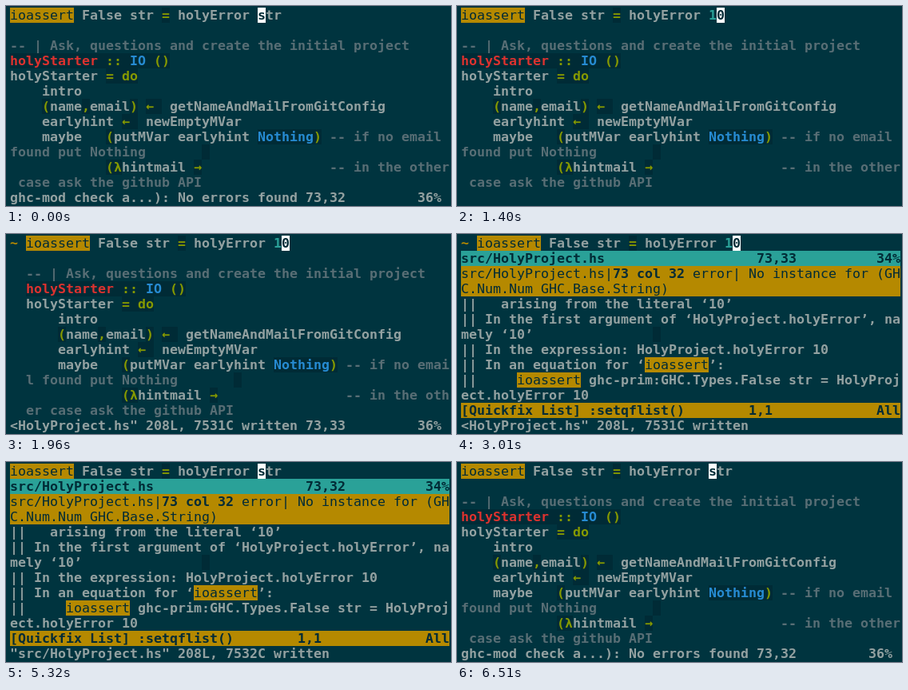
Recreate the animation shown at these times as an HTML page with a canvas. Size 557 px wide and 250 px high, loop 8190 ms.

```html
<!DOCTYPE html>
<html lang="en">
<head>
<meta charset="utf-8">
<title>Haskell editing session</title>
<style>
  html, body { margin: 0; width: 100%; height: 100%; overflow: hidden; background: #00343f; }
  canvas { display: block; }
</style>
</head>
<body>
<canvas id="stage" width="557" height="250"></canvas>
<script>
const ctx = document.getElementById('stage').getContext('2d');
const LOOP = 8190, COLS = 55, LEFT = 5, TOP = 2, CW = 10, RH = 19;
const BG = '#00343f', DARK = '#002b36', GOLD = '#b58900', TEAL = '#2aa198';
const FACE = '16.61px "DejaVu Sans Mono", "Liberation Mono", monospace';

// Styles used by the {key:text} markup
const STYLES = {
  p: { fg: '#93a1a1', bold: true },
  c: { fg: '#586e75', bold: true },
  r: { fg: '#dc322f', bg: DARK, bold: true },
  o: { fg: '#859900', bg: DARK, bold: true },
  b: { fg: '#268bd2', bg: DARK, bold: true },
  n: { fg: TEAL, bold: true },
  g: { fg: GOLD, bold: true },
  d: { fg: DARK, bg: DARK },
  s: { fg: DARK, bg: GOLD },
  S: { fg: DARK, bg: GOLD, bold: true },
  t: { fg: DARK, bg: TEAL, bold: true },
  k: { fg: DARK, bg: '#ffffff', bold: true }
};

function drawRun(row, col, text, style) {
  const x = LEFT + col * CW, y = TOP + row * RH;
  if (style.bg) {
    ctx.fillStyle = style.bg;
    ctx.fillRect(x, y, [...text].length * CW, RH);
  }
  ctx.font = (style.bold ? 'bold ' : '') + FACE;
  ctx.fillStyle = style.fg;
  ctx.fillText(text, x, y + 15);
}

function drawRow(row, line, base = 'p') {
  if (STYLES[base].bg) drawRun(row, 0, ' '.repeat(COLS), STYLES[base]);
  let col = 0;
  for (const m of line.matchAll(/\{(\w):([^}]*)\}|[^{]+/g)) {
    const text = m[1] ? m[2] : m[0];
    drawRun(row, col, text, STYLES[m[1] || base]);
    col += [...text].length;
  }
}

// Place several pieces of text at fixed columns
function columns(...parts) {
  let line = '';
  for (let i = 0; i < parts.length; i += 2) line = line.padEnd(parts[i]) + parts[i + 1];
  return line;
}

const cursor = (row, col, ch = ' ') => drawRun(row, col, ch, STYLES.k);

function drawHead(arg, sign) {
  const shown = /\d/.test(arg) ? `{n:${arg}}` : arg;
  drawRow(0, `${sign ? '{g:~} ' : ''}{s:ioassert} False str {o:=} holyError ${shown}`);
}

function drawCode(sign) {
  const gap = ' '.repeat(16);
  const wrap = sign
    ? ['emai', `{c:l found put Nothing}       {d: }`, 'oth', 'er case ask the github API']
    : ['email', `{c:found put Nothing}       {d: }`, 'other', ' case ask the github API'];
  const pad = sign ? '  ' : '';
  [
    '{c:-- | Ask, questions and create the initial project}',
    '{r:holyStarter }{o:::}{d: }{b:IO}{d: }{o:()}',
    'holyStarter {o:=}{d: }{o:do}',
    '    intro',
    '    {o:(}name{o:,}email{o:)} {o:←}{d: } getNameAndMailFromGitConfig',
    '    earlyhint {o:←}{d: } newEmptyMVar',
    `    maybe   {o:(}putMVar earlyhint {b:Nothing}{o:)} {c:-- if no ${wrap[0]}}`,
    wrap[1],
    `            {o:(λ}hintmail {o:→}${gap}{c:-- in the ${wrap[2]}}`,
    `{c:${wrap[3]}}`
  ].forEach((line, i) => drawRow(i + 2, pad + line));
}

function drawList() {
  drawRow(2, 'src/HolyProject.hs|{S:73 col 32} error| No instance for (GH', 's');
  drawRow(3, 'C.Num.Num GHC.Base.String)', 's');
  [
    '||   arising from the literal ‘10’',
    '|| In the first argument of ‘HolyProject.holyError’, na',
    'mely ‘10’' + ' '.repeat(15) + '{d: }',
    '|| In the expression: HolyProject.holyError 10',
    '|| In an equation for ‘{s:ioassert}’:',
    '||     {s:ioassert} ghc-prim:GHC.Types.False str = HolyProj',
    'ect.holyError 10'
  ].forEach((line, i) => drawRow(i + 4, line));
}

function drawPanes(pos, dirty, empty) {
  drawRow(1, columns(0, 'src/HolyProject.hs' + (dirty ? ' [+]' : ''), 37, pos, 52 - 2 + 2, '34%'), 't');
  if (empty) {
    for (let row = 3; row < 11; row++) drawRow(row, '{c:~}');
  } else {
    drawList();
  }
  drawRow(11, columns(0, '[Quickfix List] :setqflist()', 36, empty ? '0,0-1' : '1,1', 52, 'All'), 'S');
}

const ruler = (msg, pos) => columns(0, msg, 37, pos, 51, '36%');
const CHECKED = ruler('ghc-mod check a...): No errors found', '73,32');
const SAVED = '<HolyProject.hs" 208L, 7531C written';

// at: start in ms; cur: [row, col, character]; pos: opens the split panes
const SCENES = [
  { at: 0, arg: 'str', msg: CHECKED, cur: [0, 31, 's'] },
  { at: 560, arg: '', msg: ruler('-- INSERT --', '73,32'), cur: [0, 31] },
  { at: 980, arg: '1', msg: ruler('-- INSERT --', '73,33'), cur: [0, 32] },
  { at: 1120, arg: '10', msg: ruler('-- INSERT --', '73,34'), cur: [0, 33] },
  { at: 1400, arg: '10', msg: '', cur: [0, 32, '0'] },
  { at: 1540, arg: '10', msg: ':', cur: [12, 2] },
  { at: 1680, arg: '10', msg: ':w', cur: [12, 2] },
  { at: 1820, arg: '10', msg: SAVED },
  { at: 1960, arg: '10', sign: true, msg: ruler(SAVED, '73,33'), cur: [0, 34, '0'] },
  { at: 3010, arg: '10', sign: true, pos: '73,33', msg: SAVED, cur: [0, 34, '0'] },
  { at: 4410, arg: 'str', sign: true, pos: '73,32', dirty: true,
    msg: '1 change; before #2  3 seconds ago', cur: [0, 33, 's'] },
  { at: 4900, arg: 'str', sign: true, pos: '73,32', dirty: true, msg: ':', cur: [12, 2] },
  { at: 5040, arg: 'str', sign: true, pos: '73,32', dirty: true, msg: ':w', cur: [12, 2] },
  { at: 5250, arg: 'str', sign: true, pos: '73,32', dirty: true,
    msg: '"src/HolyProject.hs" 208L, 7532C written' },
  { at: 5320, arg: 'str', pos: '73,32',
    msg: '"src/HolyProject.hs" 208L, 7532C written', cur: [0, 31, 's'] },
  { at: 6230, arg: 'str', pos: '73,32', empty: true,
    msg: '"src/HolyProject.hs" 208L, 7532C written', cur: [0, 31, 's'] },
  { at: 6510, arg: 'str', msg: CHECKED, cur: [0, 31, 's'] }
];

function drawScene(s) {
  ctx.fillStyle = BG;
  ctx.fillRect(0, 0, 557, 250);
  drawHead(s.arg, s.sign);
  if (s.pos) drawPanes(s.pos, s.dirty, s.empty);
  else drawCode(s.sign);
  drawRow(12, s.msg);
  if (s.cur) cursor(...s.cur);
}

const start = performance.now();
function tick() {
  const t = (performance.now() - start) % LOOP;
  drawScene(SCENES.findLast(s => s.at <= t));
  requestAnimationFrame(tick);
}
tick();
</script>
</body>
</html>
```
